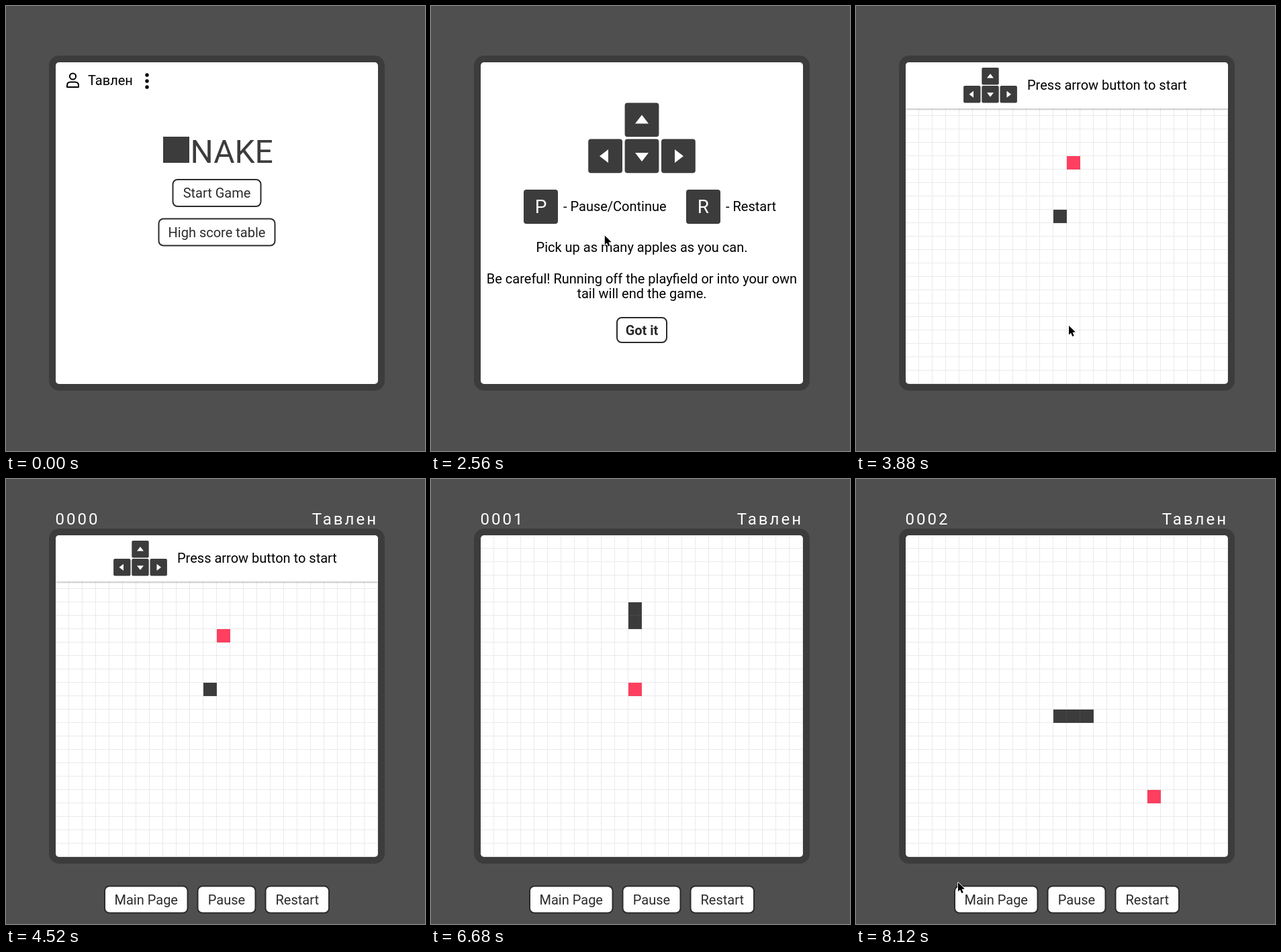
Recreate the animation shown at these times as an HTML page. Size 624 by 664 pixels, loop 8.16 s.

```html
<!DOCTYPE html>
<html lang="en">
<head>
<meta charset="utf-8">
<title>Game walkthrough</title>
<style>
  html, body { margin: 0; width: 100%; height: 100%; overflow: hidden; background: #4f4f4f; }
  svg { display: block; width: 624px; height: 664px; font: 20px Roboto, sans-serif; }
  .mid { text-anchor: middle; }
  .hud { font-size: 24px; letter-spacing: 3px; fill: #fff; }
  .btn { fill: #fff; stroke: #2b2b2b; stroke-width: 2; }
  .label { text-anchor: middle; fill: #2b2b2b; }
  .key { fill: #3c3c3c; }
  .glyph { fill: #fff; }
  .letter { font-size: 28px; fill: #fff; text-anchor: middle; }
</style>
</head>
<body>
<svg viewBox="0 0 624 664">
  <defs>
    <clipPath id="inner"><rect x="74" y="84" width="480" height="480" rx="5"/></clipPath>
    <pattern id="lines" x="74" y="84" width="20" height="20" patternUnits="userSpaceOnUse">
      <path d="M19 0h1v20h-20v-1h19z" fill="#808080" fill-opacity=".16"/>
    </pattern>
    <filter id="shade" x="-5%" y="-20%" width="110%" height="150%">
      <feDropShadow dx="0" dy="1" stdDeviation="1.4" flood-opacity=".35"/>
    </filter>
    <g id="arrows">
      <g class="key">
        <rect x="-25.4" y="0" width="50.8" height="50.8" rx="4"/>
        <rect x="-79.8" y="54" width="50.8" height="50.8" rx="4"/>
        <rect x="-25.4" y="54" width="50.8" height="50.8" rx="4"/>
        <rect x="29" y="54" width="50.8" height="50.8" rx="4"/>
      </g>
      <path class="glyph" d="M-10 31h20l-10-13zM-10 74.5h20l-10 13zM-50 69.5v20l-13-10zM49 69.5v20l13-10z"/>
    </g>
  </defs>

  <rect width="624" height="664" fill="#4f4f4f"/>
  <rect x="64" y="74" width="500" height="500" rx="15" fill="#3c3c3c"/>
  <rect x="74" y="84" width="480" height="480" rx="5" fill="#fff"/>

  <g id="menu">
    <g fill="none" stroke="#000" stroke-width="2">
      <circle cx="99.5" cy="105" r="4.6"/>
      <path d="M91 121v-2.5q0-5 5-5h7q5 0 5 5v2.5z" stroke-linejoin="round"/>
    </g>
    <text class="user" x="122" y="118"></text>
    <circle cx="210" cy="103" r="2.7"/>
    <circle cx="210" cy="112" r="2.7"/>
    <circle cx="210" cy="121" r="2.7"/>
    <rect x="234" y="195" width="39" height="39" fill="#3c3c3c"/>
    <text x="274.5" y="234" font-size="48" fill="#3c3c3c">NAKE</text>
  </g>

  <g id="help">
    <use href="#arrows" x="314" y="144.5"/>
    <rect class="key" x="138" y="274" width="51" height="51" rx="4"/>
    <text class="letter" x="163.5" y="308.5">P</text>
    <text x="197" y="306">- Pause/Continue</text>
    <rect class="key" x="380" y="274" width="51" height="51" rx="4"/>
    <text class="letter" x="405.5" y="308.5">R</text>
    <text x="439" y="306">- Restart</text>
    <text class="mid" x="314" y="367">Pick up as many apples as you can.</text>
    <text class="mid" x="314" y="413.5">Be careful! Running off the playfield or into your own</text>
    <text class="mid" x="314" y="436">tail will end the game.</text>
  </g>

  <g id="game">
    <g clip-path="url(#inner)">
      <rect id="apple" width="20" height="20" fill="#ff3f5f"/>
      <path id="snake" fill="#3c3c3c"/>
      <rect x="74" y="84" width="480" height="480" fill="url(#lines)"/>
      <g id="panel">
        <rect x="74" y="80" width="480" height="73" fill="#fff" filter="url(#shade)"/>
        <use href="#arrows" transform="translate(200 92) scale(.5)"/>
        <text x="255" y="125">Press arrow button to start</text>
      </g>
    </g>
    <g id="hud">
      <text id="score" class="hud" x="73.5" y="68"></text>
      <text class="hud user" x="554" y="68" text-anchor="end"></text>
    </g>
  </g>

  <path id="cursor" d="M0 0V13.6L3.1 10.8L5.3 15.9L7.7 14.9L5.6 9.9L9.8 9.6Z"
        stroke="#fff" stroke-width="1.6" stroke-linejoin="round" paint-order="stroke"/>
</svg>
<script>
const LOOP = 8160, STEP = 40, CELL = 20;
const $ = id => document.getElementById(id);
const clamp = v => Math.min(1, Math.max(0, v));
const ramp = (t, a, b) => clamp((t - a) / (b - a));
const show = (id, on) => $(id).style.display = on ? '' : 'none';

document.querySelectorAll('.user').forEach(e => e.textContent = 'Тавлен');

function add(parent, tag, attrs, text = '') {
  const e = document.createElementNS('http://www.w3.org/2000/svg', tag);
  for (const k in attrs) e.setAttribute(k, attrs[k]);
  e.textContent = text;
  return $(parent).appendChild(e);
}

function button(parent, text, x, y, w, h, weight = 400) {
  const box = add(parent, 'rect', { class: 'btn', x: x + 1, y: y + 1, width: w - 2, height: h - 2, rx: 7 });
  add(parent, 'text', { class: 'label', x: x + w / 2, y: y + h / 2 + 7, 'font-weight': weight }, text);
  return box;
}

button('menu', 'Start Game', 247.5, 258, 133, 42);
button('menu', 'High score table', 226.5, 316.5, 175, 42);
const gotIt = button('help', 'Got it', 276, 464, 76, 39, 700);
button('hud', 'Main Page', 146, 606.5, 125.5, 42);
button('hud', 'Pause', 284.5, 606.5, 88, 42);
button('hud', 'Restart', 385.5, 606.5, 96.5, 42);

// Snake: one direction per tick, cells counted from the board corner
const DIRS = { R: [1, 0], L: [-1, 0], U: [0, -1], D: [0, 1] };
const trail = [[11, 11]];
for (const d of 'RUUUUUULDDDDDDDDRR') {
  const [x, y] = trail[trail.length - 1];
  trail.push([x + DIRS[d][0], y + DIRS[d][1]]);
}
const ticks = [5440, 5600, 5760, 5920, 6080, 6200, 6400, 6520];
while (ticks.length < trail.length - 1) ticks.push(6680 + 160 * (ticks.length - 8));
const apples = [[12, 7], [11, 11], [18, 19]];
const meals = [6080, 7480];

// Pointer moves: start, end, power of the ease-out, then a quadratic curve
const moves = [
  [0, 860, 1.5, 284, 668, 262, 440, 275, 287],
  [2360, 3220, 1.1, 275, 287, 225, 402, 317, 477],
  [4040, 4300, 1, 317, 477, 150, 500, -20, 540],
  [7600, 7940, 2, -14, 560, 70, 570, 152, 602]
];

function pointer(t) {
  const [a, b, p, x0, y0, x1, y1, x2, y2] = moves.filter(m => m[0] <= t).pop();
  const s = 1 - (1 - ramp(t, a, b)) ** p;
  const curve = (u, v, w) => u * (1 - s) ** 2 + 2 * v * s * (1 - s) + w * s * s;
  return [curve(x0, x1, x2), curve(y0, y1, y2)];
}

function draw(t) {
  show('menu', t < 1920);
  show('help', t >= 1920 && t < 3880);
  show('game', t >= 3880);

  const grey = 255 - 22 * ramp(t, 3120, 3320);
  gotIt.style.fill = `rgb(${grey},${grey},${grey})`;

  const eaten = meals.filter(m => m <= t).length;
  const head = ticks.filter(k => k <= t).length;
  const body = trail.slice(Math.max(0, head - eaten), head + 1);
  $('snake').setAttribute('d', body.map(([x, y]) => `M${74 + x * CELL} ${84 + y * CELL}h20v20h-20z`).join(''));
  $('apple').setAttribute('x', 74 + apples[eaten][0] * CELL);
  $('apple').setAttribute('y', 84 + apples[eaten][1] * CELL);
  $('score').textContent = String(eaten).padStart(4, '0');
  $('hud').style.opacity = ramp(t, 4040, 4520);
  $('panel').style.opacity = 1 - ramp(t, 5040, 5440);

  $('cursor').setAttribute('transform', `translate(${pointer(t)})`);
}

const start = performance.now();
function tick() {
  const t = (performance.now() - start) % LOOP;
  draw(Math.floor(t / STEP) * STEP);
  requestAnimationFrame(tick);
}
tick();
</script>
</body>
</html>
```
